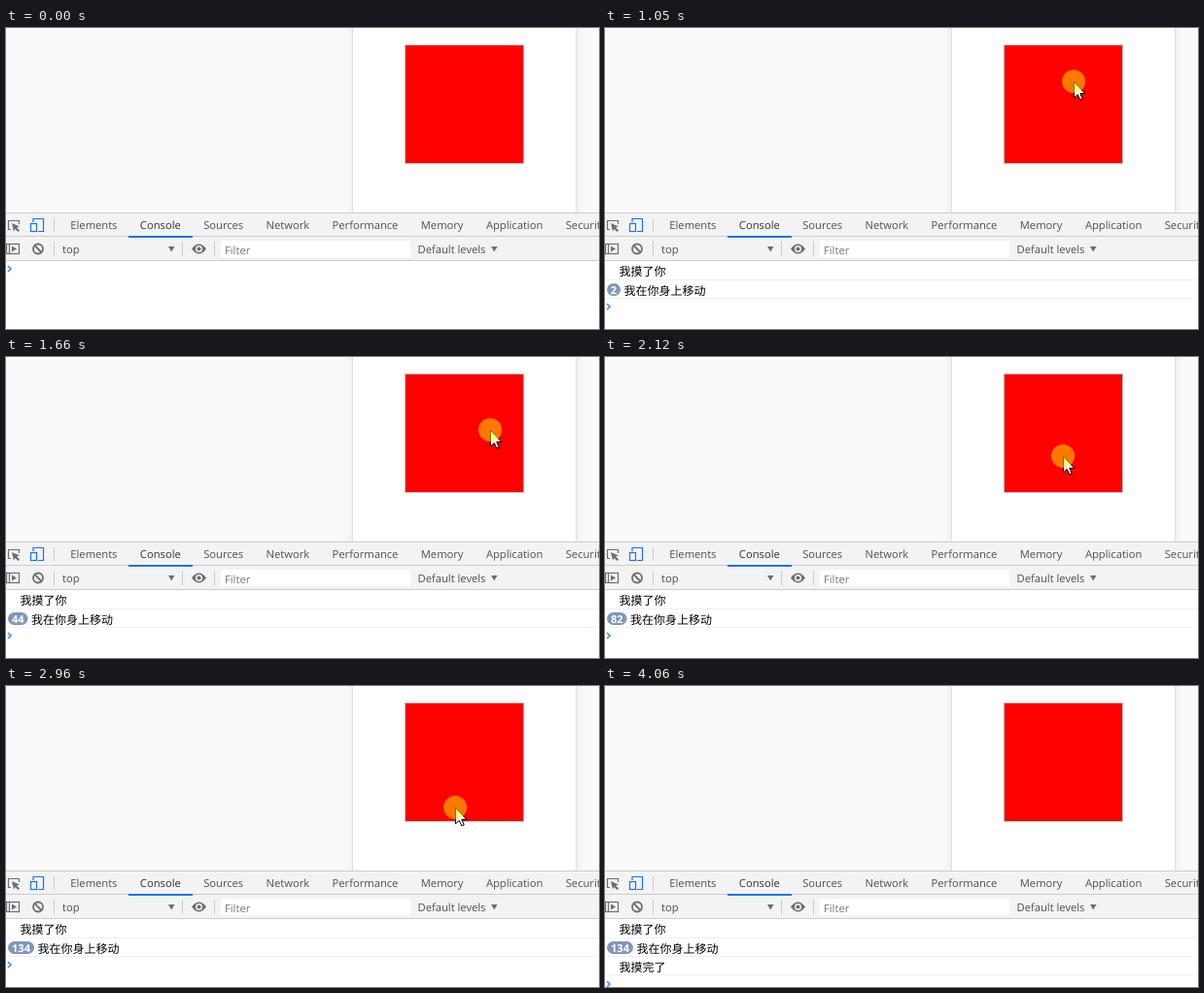
Recreate the animation shown at these times as an HTML page. Size 610 px wide and 310 px high, loop 4.44 s.

```html
<!DOCTYPE html>
<html lang="en">
<head>
<meta charset="utf-8">
<title>Touch events in the console</title>
<style>
html, body { margin: 0; width: 100%; height: 100%; overflow: hidden; background: #fff; }
svg { display: block; width: 610px; height: 310px; }
text { font: 11.2px "Open Sans", "Noto Sans", sans-serif; fill: #505050; text-rendering: geometricPrecision; }
.log text { font: 12px "Noto Sans CJK SC", "Noto Sans CJK", sans-serif; fill: #000; }
.log .num { font: bold 11px "Open Sans", "Noto Sans", sans-serif; fill: #fff; text-anchor: middle; }
.line { stroke: #ccc; fill: none; }
.log .line { stroke: #f0f0f0; }
.icon { stroke: #6e6e6e; fill: none; stroke-width: 1.2; }
.solid { fill: #6e6e6e; }
.page { fill: #fff; stroke: #e0e0e0; filter: drop-shadow(0 0 5px rgba(0, 0, 0, .08)); }
</style>
</head>
<body>
<svg viewBox="0 0 610 310">
  <rect width="610" height="190" fill="#fafafa"/>
  <rect class="page" x="356.5" y="-30" width="230" height="260"/>
  <rect x="410.5" y="17.5" width="122" height="122" fill="#f00" stroke="#bbb"/>

  <rect y="190" width="610" height="50" fill="#f3f3f3"/>
  <rect y="240" width="610" height="70" fill="#fff"/>
  <path class="line" d="M0 190.5H610M0 214.5H610M0 239.5H610M49.5 196V210M49.5 220V235M181.5 220V235M214.5 220V235"/>
  <rect x="126" y="214" width="66" height="2" fill="#1a73e8"/>
  <text id="tabs" x="66.3" y="207"></text>

  <path class="icon" d="M5 207.5H2.5V198.5H13.5V202"/>
  <path class="solid" d="M6 201L14 204.5L11 205.5L14 208.5L12.5 210L9.5 207L8 209.5Z"/>
  <g fill="none" stroke="#1a73e8" stroke-width="1.2">
    <path d="M28 200V196.5H38.5V209.5H33"/>
    <rect x="25.5" y="201.5" width="6" height="8"/>
  </g>
  <rect class="icon" x="0.5" y="222.5" width="13" height="10"/>
  <path class="icon" d="M3.5 222V233"/>
  <path class="solid" d="M6 224.5L11 227.5L6 230.5Z"/>
  <g class="icon" style="stroke-width:1.8"><circle cx="33" cy="227.5" r="5"/><path d="M29.5 224L36.5 231"/></g>
  <path class="solid" d="M167 225H173.5L170.2 230.5ZM499 225H505.5L502.2 230.5Z"/>
  <path class="solid" d="M191 227.5Q198.5 217.5 206 227.5Q198.5 237.5 191 227.5Z"/>
  <circle cx="198.5" cy="227.5" r="3.5" fill="#f3f3f3"/>
  <circle class="solid" cx="198.5" cy="227.5" r="2"/>
  <rect x="221" y="219" width="195" height="17" fill="#fff"/>
  <text x="58" y="232">top</text>
  <text x="225" y="233" style="fill:#777">Filter</text>
  <text x="423.5" y="232">Default levels</text>

  <g class="log">
    <g id="start"><text x="14.5" y="255">我摸了你</text><path class="line" d="M0 259.5H610"/></g>
    <g id="move">
      <rect id="pill" x="2" y="263" height="13" rx="6.5" fill="#8097bd"/>
      <text id="num" class="num" y="274"></text>
      <text id="msg" y="275">我在你身上移动</text>
      <path class="line" d="M0 278.5H610"/>
    </g>
    <g id="end"><text x="14.5" y="294">我摸完了</text><path class="line" d="M0 297.5H610"/></g>
  </g>
  <path id="prompt" d="M2 -3L5 0L2 3" fill="none" stroke="#4a8df0" stroke-width="1.7"/>

  <g id="pointer">
    <path d="M0.5 0.5V17L4.2 13.5L6.8 19L9.2 18L6.8 12.5H11.8Z" fill="#fff" stroke="#000"/>
    <circle id="touch" r="12" fill="#ff0" fill-opacity=".47"/>
  </g>
</svg>
<script>
const LOOP = 4440, TICK = 510 / 11, LEAD = 30;   // ms
const PRESS = 540, RELEASE = 3470, DONE = 3500;
const TABS = ["Elements", "Console", "Sources", "Network", "Performance", "Memory", "Application", "Security"];

// Stops of the pointer: tick, x, y and touch moves counted so far.
const PATH = [
  [0, 519, 283, 0], [6, 487, 50, 0], [21, 487, 50, 0],
  [26, 462, 73, 8], [33, 495, 67, 36], [35, 498, 75, 44], [45, 471, 102, 82],
  [49, 505, 112, 96], [51, 505, 112, 96], [63, 462, 125, 134],
  [81, 462, 125, 134], [83, 419, 172, 134], [87, 532, 330, 134]
];

const $ = id => document.getElementById(id);
const show = (id, on) => $(id).style.display = on ? "" : "none";
const set = (id, name, value) => $(id).setAttribute(name, value);

$("tabs").innerHTML = TABS.map((name, i) =>
  `<tspan dx="${i && 23.4}"${name == "Console" ? ' style="fill:#333"' : ""}>${name}</tspan>`).join("");

function along(tick) {
  const i = PATH.findIndex(p => p[0] > tick);
  if (i < 1) return PATH.at(i);
  const a = PATH[i - 1], b = PATH[i], u = (tick - a[0]) / (b[0] - a[0]);
  return a.map((v, j) => Math.round(v + (b[j] - v) * u));
}

function draw(t) {
  const tick = Math.floor((t - LEAD) / TICK + 0.1);   // the screen refreshes in even ticks
  const [, x, y, count] = along(tick);
  const started = t >= PRESS, moved = count > 0 && started, ended = t >= DONE;
  show("pointer", tick >= 0 && y < 310);
  show("touch", started && t < RELEASE);
  set("pointer", "transform", `translate(${x} ${y})`);

  show("start", started);
  show("move", moved);
  show("end", ended);
  set("prompt", "transform", `translate(0 ${Math.round(248 + 19.6 * (started + moved + ended))})`);

  const label = String(count), width = 7.5 + 6.5 * label.length;
  $("num").textContent = label;
  set("num", "x", 2 + width / 2);
  set("pill", "width", width);
  set("msg", "x", width + 5.5);
}

const begin = performance.now();
function frame() {
  draw((performance.now() - begin) % LOOP);
  requestAnimationFrame(frame);
}
frame();
</script>
</body>
</html>
```
